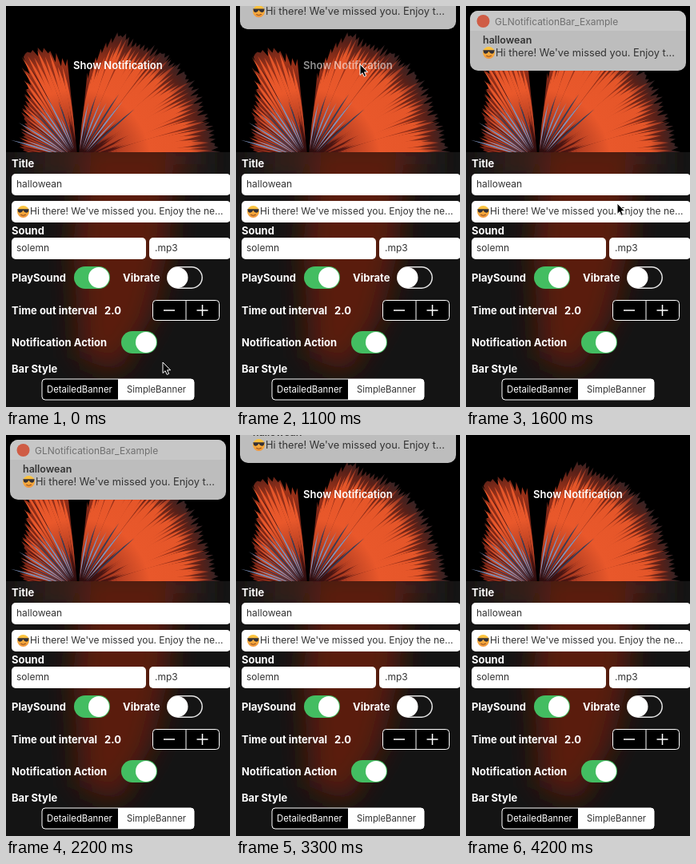
These frames come from a looping animation (280 by 502 pixels, 4900 ms). An HTML page:

```html
<!DOCTYPE html>
<html lang="en">
<head>
<meta charset="utf-8">
<title>Notification demo</title>
<style>
  html, body { margin: 0; width: 100%; height: 100%; overflow: hidden; background: #000; }
  svg { display: block; width: 280px; height: 502px; }
  text { font: 12px Inter, "Open Sans", sans-serif; fill: #333; }
  .label { font-size: 13px; font-weight: 700; fill: #fff; }
  .segment { font-size: 11.3px; }
</style>
</head>
<body>
<svg viewBox="0 0 280 502">
  <defs>
    <radialGradient id="fin" gradientUnits="userSpaceOnUse" cx="90" cy="195" r="182">
      <stop offset="0" stop-color="#1d090d"/>
      <stop offset=".3" stop-color="#5f1a14"/>
      <stop offset=".7" stop-color="#9c3219"/>
      <stop offset=".86" stop-color="#592018"/>
      <stop offset="1" stop-color="#242329"/>
    </radialGradient>
    <radialGradient id="flame" gradientUnits="userSpaceOnUse" cx="90" cy="195" r="182">
      <stop offset="0" stop-color="#3a1013"/>
      <stop offset=".25" stop-color="#ab3a20"/>
      <stop offset=".5" stop-color="#e9582b"/>
      <stop offset=".78" stop-color="#e55629"/>
      <stop offset=".91" stop-color="#833022"/>
      <stop offset="1" stop-color="#3b3a42"/>
    </radialGradient>
    <linearGradient id="face" x2="0" y2="1">
      <stop offset="0" stop-color="#fbc93f"/>
      <stop offset="1" stop-color="#f0943a"/>
    </linearGradient>
    <filter id="blur" x="-50%" y="-50%" width="200%" height="200%"><feGaussianBlur stdDeviation="17"/></filter>
    <clipPath id="photoClip"><path d="M0 0H280V183H0Z"/></clipPath>
    <clipPath id="panelClip"><path d="M0 183H280V502H0Z"/></clipPath>
    <clipPath id="bannerClip"><rect x="5" y="6" width="270" height="75" rx="10"/></clipPath>
    <g id="emoji">
      <circle r="7.5" fill="url(#face)"/>
      <path d="M-7.2-3.2H7.2L6.2.2Q3.6 2.2 1.2 0L.4-1.5H-.4L-1.2 0Q-3.6 2.2-6.2.2Z" fill="#343036"/>
      <path d="M-3.2 3.8Q0 6 3.4 3.6" fill="none" stroke="#8a4a1e"/>
    </g>
    <g id="switchOn">
      <rect width="45" height="28" rx="14" fill="#43bd61"/>
      <circle cx="31" cy="14" r="13" fill="#fff"/>
    </g>
  </defs>

  <rect width="280" height="502"/>
  <g id="fish" clip-path="url(#photoClip)"></g>
  <text id="show" class="label" x="84" y="79" style="font-weight:600">Show Notification</text>

  <g clip-path="url(#panelClip)">
    <path d="M0 183H280V502H0Z" fill="#141414"/>
    <g filter="url(#blur)">
      <path d="M30 170H245V212H30Z" fill="#38201f"/>
      <path d="M98 165H212L204 300L182 390L140 460L92 440L84 300Z" fill="#5a1b10"/>
    </g>
  </g>

  <g fill="#fff">
    <rect x="7" y="210" width="274" height="27" rx="5"/>
    <rect x="7" y="244" width="274" height="27" rx="5"/>
    <rect x="7" y="290" width="168" height="27" rx="5"/>
    <rect x="179" y="290" width="102" height="27" rx="5"/>
  </g>
  <text x="13" y="227">hallowean</text>
  <use href="#emoji" x="21.5" y="257.5"/>
  <text x="30" y="261">Hi there! We've missed you. Enjoy the ne...</text>
  <text x="13" y="307">solemn</text>
  <text x="186" y="307">.mp3</text>

  <g id="labels"></g>

  <use href="#switchOn" x="85" y="326"/>
  <use href="#switchOn" x="144" y="407"/>
  <rect x="201.8" y="326.8" width="43.4" height="26.4" rx="13.2" fill="none" stroke="#e4e4e4" stroke-width="1.5"/>
  <circle cx="214.5" cy="340" r="13" fill="#fff"/>

  <g stroke="#fff">
    <rect x="183.5" y="368.5" width="83" height="25" rx="4"/>
    <path d="M225 368.5V393.5"/>
    <path d="M197 381H211M238.5 381H252.5M245.5 374V388" stroke-width="1.5"/>
  </g>

  <rect x="45" y="467" width="190" height="26" rx="4" stroke="#fff"/>
  <path d="M140 467H231a4 4 0 0 1 4 4V489a4 4 0 0 1-4 4H140Z" fill="#fff"/>
  <text class="segment" x="51" y="483.5" style="fill:#fff">DetailedBanner</text>
  <text class="segment" x="151" y="483.5">SimpleBanner</text>

  <g id="banner">
    <g clip-path="url(#bannerClip)">
      <path d="M5 6H275V81H5Z" fill="#bdbdbd"/>
      <path d="M5 6H275V31H5Z" fill="#c7c7c7"/>
    </g>
    <circle cx="21.5" cy="19" r="8" fill="#cf5c45"/>
    <text x="36" y="23.5" style="fill:#707070">GLNotificationBar_Example</text>
    <text x="21" y="47" style="font-size:12.5px;font-weight:600">hallowean</text>
    <use href="#emoji" x="28.5" y="58.5"/>
    <text x="37" y="63" style="font-size:12.8px">Hi there! We've missed you. Enjoy t...</text>
  </g>

  <path id="cursor" d="M0 0V13.5L3.1 10.7L5.2 15.4L7.6 14.3L5.5 9.8H9.6Z" stroke="#fff"/>
</svg>
<script>
const LOOP = 4900, STEP = 100;
const $ = id => document.getElementById(id);
const clamp = v => Math.min(1, Math.max(0, v));
const progress = (t, from, to) => clamp((t - from) / (to - from));
const smooth = u => u * u * (3 - 2 * u);

function add(parent, tag, attrs, text = '') {
  const el = document.createElementNS('http://www.w3.org/2000/svg', tag);
  for (const key in attrs) el.setAttribute(key, attrs[key]);
  el.textContent = text;
  parent.append(el);
}

[['Title', 7, 202], ['Sound', 7, 286], ['PlaySound', 7, 345], ['Vibrate', 146, 345],
 ['Time out interval', 7, 386], ['2.0', 123, 386], ['Notification Action', 7, 426],
 ['Bar Style', 7, 459]]
  .forEach(([text, x, y]) => add($('labels'), 'text', { x, y, class: 'label' }, text));

let seed = 11;
const random = () => (seed = seed * 16807 % 2147483647) / 2147483647;

// Position on a ray from the root of the tail, angle in degrees.
function polar(angle, radius) {
  const a = angle * Math.PI / 180;
  return [90 + radius * Math.cos(a), 195 - radius * Math.sin(a)].map(v => v.toFixed(1)).join(' ');
}

// Linear interpolation through rows of [key, ...values].
function along(rows, key) {
  let i = 1;
  while (i < rows.length - 1 && rows[i][0] < key) i++;
  const [a, b] = [rows[i - 1], rows[i]];
  const u = progress(key, a[0], b[0]);
  return a.slice(1).map((v, k) => v + (b[k + 1] - v) * u);
}

// A leaf that tapers at both ends and bends towards its tip.
function petal(angle, from, to, width, bend, fill) {
  const middle = (from + to) * .55, tip = polar(angle - bend, to);
  add($('fish'), 'path', {
    d: `M${polar(angle, from)}Q${polar(angle + width, middle)} ${tip}Q${polar(angle - width, middle)} ${polar(angle, from)}Z`,
    fill
  });
}

// A fan of petals whose rim follows [angle, radius] points.
function drawFan({ rim, petals, bend, blue }) {
  const first = rim[0][0], span = rim[rim.length - 1][0] - first;
  const reach = angle => along(rim, angle)[0];
  const edge = [];
  for (let i = 0; i <= petals * 2; i++) {
    const angle = first + span * i / petals / 2;
    edge.push(polar(angle, reach(angle) - (i % 2 ? 6 + random() * 12 : random() * 6)));
  }
  add($('fish'), 'path', { d: `M${polar(0, 0)}L${edge.join('L')}Z`, fill: 'url(#fin)' });

  for (let i = 0; i < petals; i++) {
    const angle = first + span * (i + .5) / petals;
    const radius = reach(angle);
    petal(angle, radius * (.08 + random() * .25), radius * (.86 + random() * .13), 1.6 + random() * 2, bend, 'url(#flame)');
    if (i % 3 === 0) petal(angle + 1.5, radius * .3, radius * .85, .7, bend, '#3d1010');
  }
  for (let i = 0; i < blue.count; i++) {
    const angle = blue.from + (blue.to - blue.from) * i / (blue.count - 1);
    petal(angle, 16, blue.reach * (.65 + random() * .35), 1.8, bend, i % 3 ? '#7f93bd' : '#343c59');
  }
}
drawFan({
  rim: [[4, 179], [22, 174], [36, 179], [49, 179], [62, 172], [73, 172], [78, 148], [84, 118]],
  petals: 44, bend: 2, blue: { from: 45, to: 82, count: 8, reach: 105 }
});
drawFan({
  rim: [[96, 130], [107, 155], [116, 157], [125, 112], [146, 86], [171, 74]],
  petals: 28, bend: -2, blue: { from: 106, to: 160, count: 15, reach: 92 }
});

const cursorPath = [[100, 196, 446], [600, 155, 73], [1200, 155, 73], [1600, 189, 247], [1900, 198, 440]];

function render(t) {
  const enter = progress(t, 1000, 1400), leave = smooth(progress(t, 3100, 3500));
  const y = -92 * ((1 - enter) ** 2 + leave);
  $('banner').setAttribute('transform', `translate(0 ${y})`);
  $('show').setAttribute('opacity', t < 900 ? 1 : .45 + .55 * progress(t, 1000, 1500));

  const [cx, cy] = along(cursorPath, t);
  $('cursor').setAttribute('transform', `translate(${cx} ${cy})`);
  $('cursor').setAttribute('visibility', t < 2000 ? 'visible' : 'hidden');
}

const begin = performance.now();
function tick() {
  const t = (performance.now() - begin) % LOOP;
  render(Math.floor(t / STEP) * STEP);
  requestAnimationFrame(tick);
}
tick();
</script>
</body>
</html>
```
